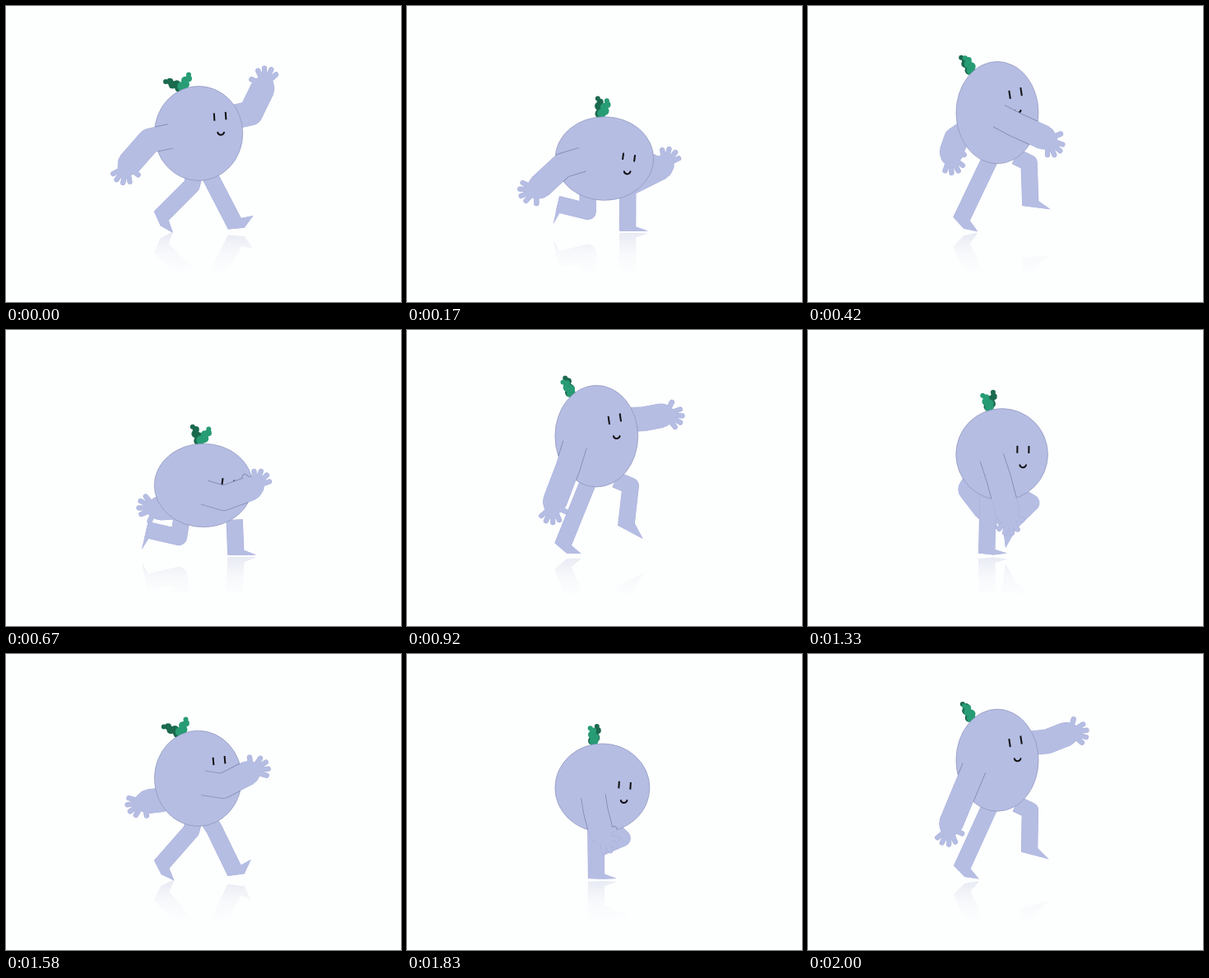
Animation, 480 px wide and 360 px high, one loop 2080 ms. Source, as an HTML page with a canvas:

```html
<!DOCTYPE html>
<html lang="en">
<head>
<meta charset="utf-8">
<title>Happy walk</title>
<style>
  html, body { margin: 0; width: 100%; height: 100%; overflow: hidden; background: #fdfefe; }
  canvas { display: block; width: 100vw; height: 100vh; }
</style>
</head>
<body>
<canvas id="stage" width="480" height="360"></canvas>
<script>
const ctx = document.getElementById('stage').getContext('2d');
const LOOP = 2080, POSES = 25, STRIDE = 12.75; // poses per two steps
const GROUND = 275, PAPER = '253,254,254';
const SKIN = '#b5bde3', EDGE = '#a6aed7', LINE = '#858db5', MIRROR = '#dfe2ef';

// Key points spaced evenly over one stride.
const HIP = [[12], [38], [-16], [-8], [-5], [-27], [14], [23]];
const ANKLE = [[279, 267], [280, 273], [219, 272], [187, 262],
  [187, 257], [170, 243], [241, 238], [268, 240]];
const NEAR_PALM = [[147, 195], [138, 218], [241, 228], [288, 168],
  [299, 143], [303, 190], [222, 225], [174, 212]];
const FAR_PALM = [[314, 96], [334, 178], [222, 222], [176, 185],
  [168, 181], [181, 217], [262, 180], [317, 98]];

const rad = deg => deg * Math.PI / 180;
const wave = (phase, peak) => Math.cos(2 * Math.PI * (phase - peak));
const clamp = (v, lo, hi) => Math.min(hi, Math.max(lo, v));
const ramp = (a, b, v) => clamp((v - a) / (b - a), 0, 1);
const ease = (a, b, v) => { const u = ramp(a, b, v); return u * u * (3 - 2 * u); };
const mod1 = v => v - Math.floor(v);

// Closed Catmull-Rom curve.
function along(keys, phase) {
  const n = keys.length, v = mod1(phase) * n, k = Math.floor(v), u = v - k;
  const [a, b, c, d] = [-1, 0, 1, 2].map(i => keys[(k + i + n) % n]);
  return b.map((q, j) => q + u / 2 * (c[j] - a[j]
    + u * (2 * a[j] - 5 * q + 4 * c[j] - d[j] + u * (3 * (q - c[j]) + d[j] - a[j]))));
}

// A point part of the way from a to b, pushed sideways.
function joint([ax, ay], [bx, by], part, push) {
  const dx = bx - ax, dy = by - ay, len = Math.hypot(dx, dy) || 1;
  return [ax + dx * part - dy / len * push, ay + dy * part + dx / len * push];
}

function bodyAt(p) {
  const s = 2 * p;
  return {
    s,
    x: 235 + 5 * wave(s, .28),
    y: 156.5 + 30 * wave(s, .245) + 2.5 * wave(2 * s, .5),
    rx: 54.9 + 4.9 * wave(s, .29),
    ry: 56.4 - 5.7 * wave(s, .28)
  };
}

function line(points, width, color, cap = 'butt') {
  ctx.beginPath();
  points.forEach(([x, y]) => ctx.lineTo(x, y));
  ctx.lineWidth = width;
  ctx.lineCap = cap;
  ctx.lineJoin = 'round';
  ctx.strokeStyle = color;
  ctx.stroke();
}

function disc(x, y, r, color) {
  ctx.beginPath();
  ctx.arc(x, y, r, 0, 7);
  ctx.fillStyle = color;
  ctx.fill();
}

// Heel strike, flat, push off, flick back, swing through.
function footAngle(q) {
  const t = mod1(q + .05);
  return rad(-42 + 42 * ease(.02, .1, t) + 45 * ease(.3, .53, t)
    + 58 * ease(.545, .58, t) - 145 * ramp(.69, 1, t) ** 2);
}

function leg(q, body, fill, edge) {
  const hip = [body.x + along(HIP, q)[0], body.y + body.ry - 9];
  const ankle = along(ANKLE, q), [ax, ay] = ankle;
  const swing = Math.sin(Math.PI * ramp(.45, 1, mod1(q)));
  const knee = joint(hip, ankle, .2, -23 * swing);
  const shin = Math.atan2(ay - knee[1], ax - knee[0]);
  const dx = Math.cos(shin), dy = Math.sin(shin);
  const a = footAngle(q), c = Math.cos(a), s = Math.sin(a);
  const heel = [ax - 10 * dy, ay + 10 * dx];
  const gap = GROUND - 1 - heel[1] - 18 * s;
  const bend = gap < 16 ? .8 * Math.max(0, gap * c) : 0;
  const sole = (d, off) => [heel[0] + d * c - off * s, heel[1] + d * s + off * c];
  const foot = [heel, sole(18, bend), sole(34.5, 0),
    [ax + 10 * dy - 5 * dx, ay - 10 * dx - 5 * dy]];
  for (const [color, grow] of [[edge, .8], [fill, 0]]) {
    line([hip, knee, ankle], 19.5 + grow, color);
    ctx.beginPath();
    foot.forEach(([x, y]) => ctx.lineTo(x, y));
    ctx.fillStyle = color;
    ctx.fill();
  }
}

function nearArm(p) {
  const b = bodyAt(p), palm = along(NEAR_PALM, p);
  const shoulder = [b.x - 14 - 17 * wave(p, 0), b.y + 4 - 4 * wave(p, .2)];
  return [shoulder, joint(shoulder, palm, .4, 5 + 8 * wave(2 * p, .12)), palm];
}

function farArm(p) {
  const b = bodyAt(p), palm = along(FAR_PALM, p), w = wave(p, -.1);
  const shoulder = [b.x + 32 * w, b.y - 20 * w];
  return [shoulder, joint(shoulder, palm, .5, 6 + 18 * wave(p, .15)), palm];
}

const forearm = ([, e, h]) => Math.atan2(h[1] - e[1], h[0] - e[0]);

function arm(pose, p, color, grow) {
  const [shoulder, elbow, palm] = pose(p), [px, py] = palm;
  const dir = forearm([shoulder, elbow, palm]);
  const turn = dir - forearm(pose(p + .06));
  const hand = dir + clamp(Math.atan2(Math.sin(turn), Math.cos(turn)), -.6, .6);
  const reach = (angle, r) => [px + r * Math.cos(angle), py + r * Math.sin(angle)];
  const wrist = reach(dir, -5);
  // The outline stops short so that the shoulder stays open.
  const start = grow ? joint(shoulder, elbow, .12, 0) : shoulder;
  line([start, elbow, wrist], 29 + grow, color);
  disc(...wrist, 14 + grow / 2, color);
  disc(px, py, 11 + grow / 2, color);
  line([palm, reach(hand - 1.4, 17)], 5.6 + grow, color, 'round');
  for (let i = 0; i < 4; i++) {
    line([palm, reach(hand - .66 + i * .42, 19 + (i % 3 ? 1.5 : 0))], 5.4 + grow, color, 'round');
  }
}

function bodyPath({ x, y, rx, ry }) {
  ctx.beginPath();
  ctx.ellipse(x, y, rx, ry, 0, 0, 2 * Math.PI);
}

function drawBody(b) {
  bodyPath(b);
  ctx.fillStyle = SKIN;
  ctx.fill();
  ctx.lineWidth = 1;
  ctx.strokeStyle = 'rgba(133,141,181,.6)';
  ctx.stroke();
}

function drawFace({ s, x, y, ry }) {
  const k = ry / 57, tilt = rad(-2 + 12 * wave(s, .3));
  const slope = Math.tan(tilt) * 7.3;
  ctx.save();
  ctx.translate(x + 26 + 4 * wave(s, .25), y - 13 + 12 * wave(s, .36));
  for (const side of [-1, 1]) {
    const ex = 7 * side, ey = slope * side, lean = 4.6 * Math.sin(tilt * .7);
    line([[ex + lean, ey - 4.6 * k], [ex - lean, ey + 4.6 * k]], 2, '#111');
  }
  ctx.beginPath();
  ctx.arc(-11 * Math.sin(tilt), 18.5 * k, 3.9, .2, Math.PI - .2);
  ctx.lineCap = 'round';
  ctx.stroke();
  ctx.restore();
}

function leaf(x, y, deg, length, color) {
  const c = Math.cos(rad(deg)), s = Math.sin(rad(deg));
  for (let i = 0; i < 5; i++) {
    const d = length * (.05 + i * .23), side = i % 2 ? 1.2 : -1.2;
    disc(x + d * c - side * s, y + d * s + side * c, 5.4 - i * i * .15, color);
  }
}

function drawLeaves({ s, x, y, rx, ry }) {
  const off = -17.5 + 14 * wave(s, .29);
  const top = y - ry * Math.sqrt(1 - (off / rx) ** 2) - 3;
  leaf(x + off - 1, top, 247 - 42 * wave(s, 0), 20, '#1b6a4e');
  leaf(x + off + 1, top, 272 + 45 * wave(s, .14), 18, '#279c75');
}

function drawMirror(p, body) {
  ctx.save();
  ctx.translate(0, 2 * GROUND);
  ctx.scale(1, -1);
  leg(p + .5, body, MIRROR, MIRROR);
  leg(p, body, MIRROR, MIRROR);
  ctx.restore();
  const fade = ctx.createLinearGradient(0, GROUND, 0, 324);
  fade.addColorStop(0, `rgba(${PAPER},.3)`);
  fade.addColorStop(.5, `rgba(${PAPER},.8)`);
  fade.addColorStop(1, `rgb(${PAPER})`);
  ctx.fillStyle = fade;
  ctx.fillRect(0, GROUND - 1, 480, 86);
}

function draw(p) {
  const body = bodyAt(p);
  ctx.fillStyle = `rgb(${PAPER})`;
  ctx.fillRect(0, 0, 480, 360);
  drawMirror(p, body);

  arm(farArm, p, EDGE, .8);
  arm(farArm, p, SKIN, 0);
  leg(p + .5, body, SKIN, EDGE);
  leg(p, body, SKIN, EDGE);
  drawLeaves(body);
  drawBody(body);
  drawFace(body);

  arm(nearArm, p, EDGE, .8);
  ctx.save();
  bodyPath(body);
  ctx.clip();
  arm(nearArm, p, LINE, 1.8);
  ctx.restore();
  arm(nearArm, p, SKIN, 0);
}

const startOf = i => Math.round(i * 25 / 3) * 10;

function tick() {
  const t = performance.now() % LOOP;
  let i = POSES - 1;
  while (startOf(i) > t) i--;
  draw(i / STRIDE);
  requestAnimationFrame(tick);
}
tick();
</script>
</body>
</html>
```
